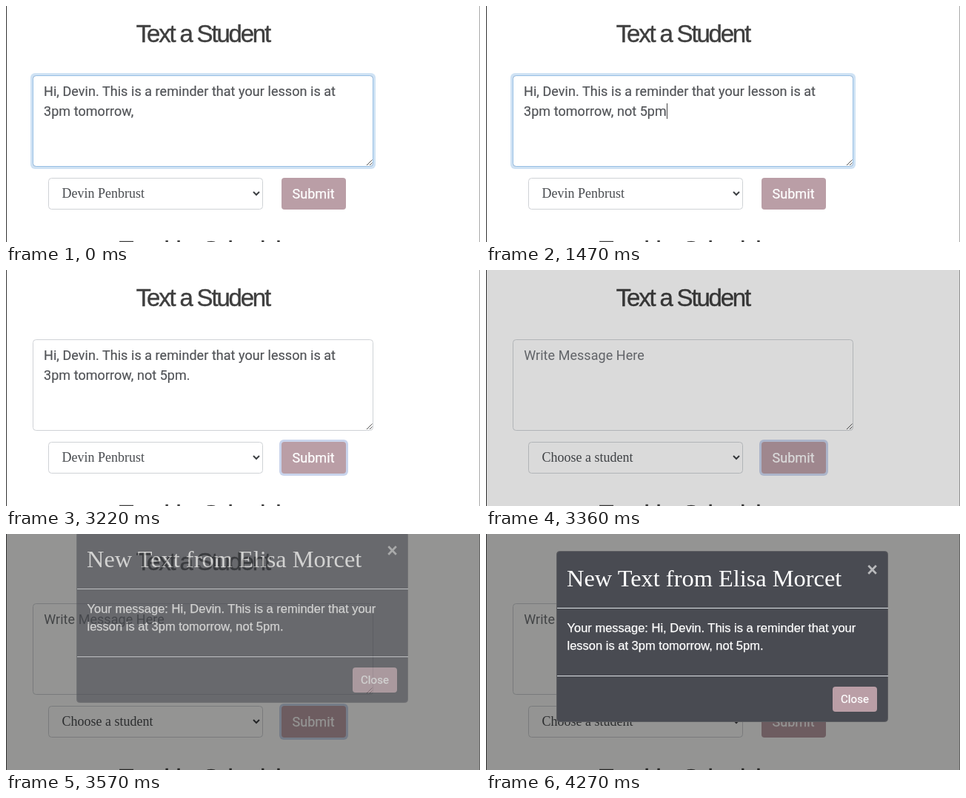
Animation, 640 px wide and 320 px high, one loop 4340 ms. Source, as an HTML page:

```html
<!DOCTYPE html>
<html lang="en">
<head>
<meta charset="utf-8">
<title>Text a Student</title>
<style>
  html, body { margin: 0; width: 100%; height: 100%; overflow: hidden; background: #fff; }
  svg { display: block; width: 640px; height: 320px; }
  text { white-space: pre; }
  .sans { font-family: Roboto, "Open Sans", sans-serif; font-size: 18px; letter-spacing: .05px; }
  .serif { font-family: "Liberation Serif", serif; font-size: 18px; }
  .title { font-family: "Liberation Sans", sans-serif; font-size: 33px; letter-spacing: -2.2px; fill: #3f3f3f; stroke: #3f3f3f; stroke-width: .4; }
  .body { font-family: "Liberation Sans", sans-serif; font-size: 16.5px; }
  .ink { fill: #525458; stroke: #525458; stroke-width: .2; }
  .light { fill: #fff; stroke: #fff; stroke-width: .25; }
  .close { font-size: 25px; font-weight: 700; fill: #b9babc; }
  .field { fill: #fff; stroke: #cfd2d6; }
  .ring { fill: #cfe2f4; }
  .glow { fill: none; stroke: #97bfe4; }
  .button { fill: #ba9ea6; }
</style>
</head>
<body>
<svg viewBox="0 0 640 320">
  <rect width="640" height="320" fill="#fff"/>
  <path d="M639.5 0V320" stroke="#aaa"/>

  <text class="title" x="175.8" y="49">Text a Student</text>
  <text class="title" x="152.5" y="341.5">Teaching</text>
  <text class="title" x="265.5" y="341.5">Schedule</text>

  <rect id="areaFocus" class="ring" x="33" y="91" width="466" height="130" rx="6"/>
  <rect class="field" x="36.5" y="94.5" width="459" height="123" rx="4"/>
  <rect id="areaGlow" class="glow" x="36.5" y="94.5" width="459" height="123" rx="4"/>
  <path d="M487 216l7.5-7.5M491 216l3.5-3.5" stroke="#555" fill="none"/>
  <g id="message" class="sans ink">
    <text x="51" y="122">Hi, Devin. This is a reminder that your lesson is at</text>
    <text id="typed" x="51" y="149"></text>
  </g>
  <text id="hint" class="sans" x="51.2" y="122" fill="#717479">Write Message Here</text>
  <rect id="caret" y="132" width="1" height="21" fill="#444"/>

  <rect id="selectFocus" class="ring" x="55" y="231" width="294" height="47" rx="6"/>
  <rect class="field" x="57.5" y="233.5" width="289" height="42" rx="4"/>
  <rect id="selectGlow" class="glow" x="57.5" y="233.5" width="289" height="42" rx="4"/>
  <text id="choice" class="serif" x="75.5" y="260" fill="#494c50"></text>
  <path d="M334 252l4 4 4-4" fill="none" stroke="#3c3f43" stroke-width="2"/>

  <rect id="buttonFocus" x="369" y="230" width="93" height="49" rx="6" fill="#c9d4ec"/>
  <rect class="button" x="372" y="233" width="87" height="43" rx="4"/>
  <text class="sans light" x="386.5" y="261">Submit</text>

  <rect id="shade" width="640" height="320" fill="#040400"/>

  <g id="modal">
    <rect x="95.5" y="23.5" width="447" height="231" rx="4" fill="#494b52" stroke="#5b5c60"/>
    <path d="M96 100.5H543M96 192.5H543" stroke="#dee2e6"/>
    <text class="serif" x="109" y="71" fill="#fff" style="font-size:32.4px">New Text from Elisa Morcet</text>
    <text class="body close" x="521.5" y="56.7" text-anchor="middle">×</text>
    <g class="body light">
      <text x="109.5" y="133">Your message: Hi, Devin. This is a reminder that your</text>
      <text x="109.5" y="157">lesson is at 3pm tomorrow, not 5pm.</text>
    </g>
    <rect class="button" x="468" y="207" width="60" height="34" rx="4"/>
    <text class="sans light" x="498" y="229" text-anchor="middle" style="font-size:15px">Close</text>
  </g>

  <path d="M.5 0V320" stroke="#333"/>
</svg>
<script>
const LOOP = 4340, STEP = 70, SENT = 3360;
const el = id => document.getElementById(id);
const start = performance.now();

// Each track lists [time, value]; a value holds until the next entry.
const tracks = {
  typed: [[0, ""], [210, "n"], [350, "no"], [490, "not"], [630, "not "], [1050, "not 5"],
          [1330, "not 5p"], [1470, "not 5pm"], [2100, "not 5pm."]],
  caret: [[0, 0], [210, 1], [1960, 0], [2100, 1], [2450, 0]],
  area: [[0, 1], [2450, .5], [2520, 0]],
  select: [[0, 0], [2450, .35], [2520, .75], [2590, 1], [2660, .5], [2730, 0]],
  button: [[0, 0], [2660, .4], [2730, .85], [2800, 1], [3920, .5], [3990, 0]],
  shade: [[0, 0], [3360, .145], [3430, .34], [3500, .425]],
  fade: [[0, 0], [3500, .15], [3570, .58], [3640, 1]],
  slide: [[0, -50], [3500, -43], [3570, -26], [3640, -12], [3710, -4], [3780, -1], [3850, 0]]
};

const at = (name, t) => tracks[name].filter(([time]) => time <= t).pop()[1];
const show = (id, opacity) => el(id).setAttribute("opacity", opacity);

function draw(t) {
  const sent = t >= SENT;
  el("typed").textContent = "3pm tomorrow, " + at("typed", t);
  el("caret").setAttribute("x", Math.round(51 + el("typed").getComputedTextLength()));
  show("caret", at("caret", t));
  show("message", sent ? 0 : 1);
  show("hint", sent ? 1 : 0);
  el("choice").textContent = sent ? "Choose a student" : "Devin Penbrust";

  for (const name of ["area", "select"]) {
    show(name + "Focus", at(name, t));
    show(name + "Glow", at(name, t));
  }
  show("buttonFocus", at("button", t));

  show("shade", at("shade", t));
  show("modal", at("fade", t));
  el("modal").setAttribute("transform", `translate(0 ${at("slide", t)})`);
}

function tick() {
  const t = (performance.now() - start) % LOOP;
  draw(Math.floor(t / STEP) * STEP);
  requestAnimationFrame(tick);
}
tick();
</script>
</body>
</html>
```
